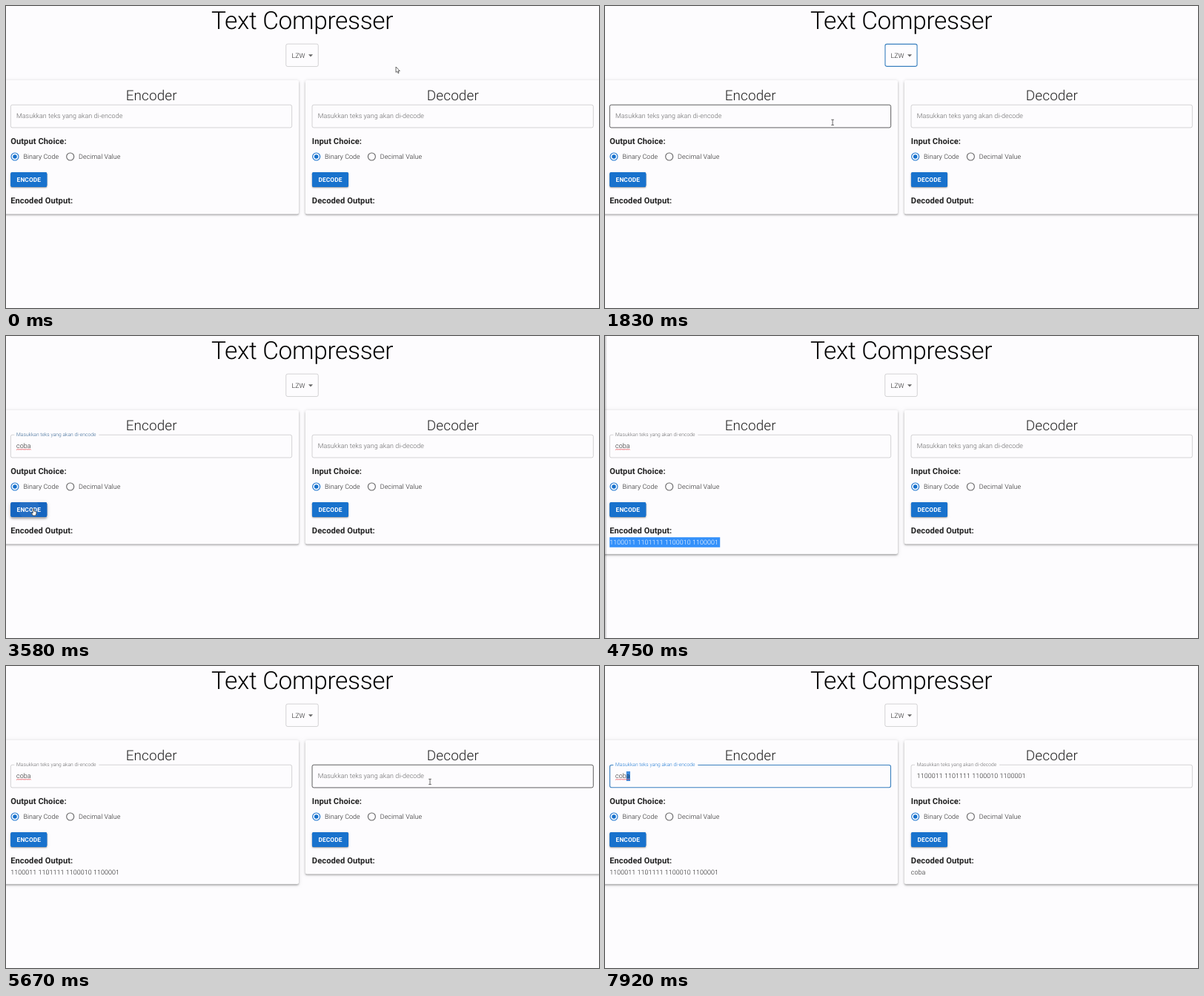
Animation of 800 by 407 pixels, one loop 8 s. Source, as an HTML page with a canvas:

```html
<!DOCTYPE html>
<html lang="id">
<head>
<meta charset="utf-8">
<title>Text Compresser</title>
<style>
html, body { margin: 0; width: 100%; height: 100%; overflow: hidden; background: #fdfcfe; }
canvas { display: block; }
</style>
</head>
<body>
<canvas id="stage" width="800" height="407"></canvas>
<script>
const ctx = document.getElementById('stage').getContext('2d');
ctx.textRendering = 'geometricPrecision';

const LOOP = 8000, STEP = 1000 / 12;
const U = 5 / 9; // page zoom: CSS px to stage px
const PAGE = '#fdfcfe', BLUE = '#1872cd', DEEP_BLUE = '#1565c0', FOCUS = '#3a80bf';
const INK = 'rgba(0,0,0,.87)', MUTED = 'rgba(0,0,0,.6)', LINE = 'rgba(0,0,0,.23)';
const BITS = '1100011 1101111 1100010 1100001';
const DECODER_X = 732 * U;

// Pointer moves: where to, when it sets off, when it arrives.
const START = { x: 526, y: 82 };
const MOVES = [
  { to: { x: 400, y: 68 }, from: 0, until: 420 },        // algorithm menu
  { to: { x: 200, y: 240 }, from: 420, until: 830 },     // encoder panel
  { to: { x: 400, y: 61 }, from: 830, until: 1170 },
  { to: { x: 600, y: 115 }, from: 1170, until: 1420 },   // decoder panel
  { to: { x: 285, y: 160 }, from: 1580, until: 1920 },   // encoder field
  { to: { x: 425, y: 172 }, from: 1920, until: 2420 },
  { to: { x: 262, y: 202 }, from: 2670, until: 3170 },
  { to: { x: 37, y: 233 }, from: 3250, until: 3500 },    // ENCODE
  { to: { x: 448, y: 268 }, from: 3580, until: 3920 },
  { to: { x: 155, y: 279 }, from: 3920, until: 4250 },   // end of the output
  { to: { x: 0, y: 281 }, from: 4250, until: 4580 },
  { to: { x: 613, y: 215 }, from: 4750, until: 4920 },
  { to: { x: 572, y: 156 }, from: 5250, until: 5670 },   // decoder field
  { to: { x: 437, y: 230 }, from: 6080, until: 6500 },   // DECODE
  { to: { x: 29, y: 148 }, from: 7250, until: 7750 }     // encoder value
];

const clamp = v => Math.max(0, Math.min(1, v));
const between = (t, a, b) => t >= a && t < b;
const progress = (t, start, length) => clamp((t - start) / length);
const lerp = (a, b, k) => a + (b - a) * k;

function pointerAt(t) {
  return MOVES.reduce((p, m) => {
    const k = 1 - (1 - progress(t, m.from, m.until - m.from)) ** 2;
    return { x: lerp(p.x, m.to.x, k), y: lerp(p.y, m.to.y, k) };
  }, START);
}

function text(str, x, y, size, { weight = 300, color = INK, align = 'left', spacing = 0.00938 } = {}) {
  ctx.font = `${weight} ${size * U}px Roboto, sans-serif`;
  ctx.letterSpacing = spacing * size * U + 'px';
  ctx.textAlign = align;
  ctx.fillStyle = color;
  ctx.fillText(str, x, y);
}

function box(x, y, w, h, r = 4 * U) {
  ctx.beginPath();
  ctx.roundRect(x, y, w, h, r);
}

function disc(x, y, r, color) {
  ctx.fillStyle = color;
  ctx.beginPath();
  ctx.arc(x, y, r, 0, 7);
  ctx.fill();
}

// Material-style elevation: a tight key shadow and a wide soft one.
function raised(x, y, w, h, color, lift) {
  ctx.save();
  ctx.fillStyle = color;
  for (const [drop, blur, alpha] of [[lift, lift + 1, 0.3], [1, lift * 3, 0.12]]) {
    ctx.shadowColor = `rgba(0,0,0,${alpha})`;
    ctx.shadowOffsetY = drop * U;
    ctx.shadowBlur = blur * U;
    box(x, y, w, h);
    ctx.fill();
  }
  ctx.restore();
}

function outline(x, y, w, h, color, thick) {
  const lw = (thick ? 2 : 1.3) * U;
  ctx.strokeStyle = color;
  ctx.lineWidth = lw;
  box(x + lw / 2, y + lw / 2, w - lw, h - lw);
  ctx.stroke();
}

function radio(label, x, on) {
  ctx.strokeStyle = on ? BLUE : MUTED;
  ctx.lineWidth = 2 * U;
  ctx.beginPath();
  ctx.arc(x, 203, 9 * U, 0, 7);
  ctx.stroke();
  if (on) disc(x, 203, 5 * U, BLUE);
  text(label, x + 11.4, 206.3, 16);
}

function selector(focused) {
  outline(377.4, 50.8, 44.2, 31.1, focused ? FOCUS : LINE, focused);
  text('LZW', 385.4, 69.6, 16);
  ctx.fillStyle = MUTED;
  ctx.beginPath();
  ctx.moveTo(408, 65.3);
  ctx.lineTo(414, 65.3);
  ctx.lineTo(411, 68.4);
  ctx.fill();
}

function field(f) {
  outline(6, 132.9, 380, 31.4, f.focus ? FOCUS : f.hover ? INK : LINE, f.focus);
  ctx.fillStyle = PAGE;
  ctx.fillRect(11.3, 132, 114 * f.float, 2.4);
  const tint = `rgba(${25 * f.tint},${118 * f.tint},${210 * f.tint},${lerp(0.6, 1, f.tint)})`;
  text(f.label, 14, lerp(151.4, 135.2, f.float), lerp(16, 12, f.float), { color: tint });
  if (f.selectLast) {
    ctx.fillStyle = '#3f8de0';
    ctx.fillRect(28.8, 142, 5.2, 13);
  }
  text(f.value, 14, 151.4, 16);
  if (f.spell) {
    ctx.strokeStyle = '#e5393f';
    ctx.lineWidth = 0.8;
    ctx.beginPath();
    const length = ctx.measureText(f.value).width;
    for (let x = 0; x < length; x += 0.5) ctx.lineTo(14 + x, 152.9 + 0.4 * Math.sin(x * 3));
    ctx.stroke();
  }
}

function button(label, b) {
  const x = 6.3, y = 224, w = 49, h = 20;
  raised(x, y, w, h, b.hover ? DEEP_BLUE : BLUE, b.hover ? 4 : 2);
  ctx.save();
  box(x, y, w, h);
  ctx.clip();
  disc(31, 233, 10 + 22 * b.spread, `rgba(255,255,255,${b.glow})`);
  ctx.restore();
  text(label, x + w / 2, 237, 15, { weight: 700, color: '#fff', align: 'center', spacing: 0.01 });
}

function output(str, selected) {
  text(str, 6.2, 281.4, 16);
  if (!selected) return;
  const w = 149 * selected;
  ctx.save();
  ctx.beginPath();
  ctx.rect(155.2 - w, 271.3, w, 13.5);
  ctx.clip();
  ctx.fillStyle = '#3390fa';
  ctx.fillRect(0, 271, 160, 14);
  text(str, 6.2, 281.4, 16, { color: '#fff' });
  ctx.restore();
}

function panel(x, p) {
  const bold = { weight: 700, spacing: 0.0075 };
  ctx.save();
  ctx.translate(x, 0);
  raised(-2.8, 100, 397.8, p.output ? 193.8 : 180.2, PAGE, 3);
  text(p.title, 196.2, 127, 34, { align: 'center', spacing: 0.00735 });
  field(p.field);
  text(p.choice, 6.2, 186.4, 20, bold);
  radio('Binary Code', 12, true);
  radio('Decimal Value', 86.7, false);
  button(p.action, p.button);
  text(p.result, 6.2, 266.4, 20, bold);
  output(p.output, p.selected);
  ctx.restore();
}

function shape(path, fill = '#fff') {
  const p = new Path2D(path);
  ctx.fillStyle = fill;
  ctx.fill(p);
  ctx.strokeStyle = '#444';
  ctx.lineWidth = 0.8;
  ctx.stroke(p);
}

const drawArrow = () => shape('M0 0V7.4L1.7 6L3 8.7L4.1 8.1L3 5.5H5.3Z');
const drawBeam = () => shape('M-1.8 -3.6H1.8M0 -3.6V3.6M-1.8 3.6H1.8');
const drawHand = () => shape('M-.8 0H.6V3L4 4V6L3 9H-.6L-3 5.4L-.8 5.8Z');

function edgeShadow() {
  const edge = ctx.createLinearGradient(0, 0, 3, 0);
  edge.addColorStop(0, 'rgba(0,0,0,.22)');
  edge.addColorStop(1, 'rgba(0,0,0,0)');
  ctx.fillStyle = edge;
  ctx.fillRect(0, 0, 3, 407);
}

function draw(t) {
  const ptr = pointerAt(t);
  const visible = !between(t, 2670, 3170) && !between(t, 4580, 4830) && t < 7920;
  const over = (x, y, w, h) => visible && ptr.x > x && ptr.x < x + w && ptr.y > y && ptr.y < y + h;
  const overField = x => over(x + 6, 133, 380, 31);
  const overButton = x => over(x + 6, 224, 49.4, 20.4);

  const typed = clamp(Math.floor((t - 2500) / 165) / 4) * 4;
  const tint = (on, off) => progress(t, on - 80, 160) * (1 - progress(t, off, 200));
  const ripple = (start, glow) => ({
    spread: progress(t, start, 420),
    glow: t < start ? 0 : glow * (1 - progress(t, start + 180, 330))
  });

  const encoder = {
    title: 'Encoder', choice: 'Output Choice:', action: 'ENCODE', result: 'Encoded Output:',
    output: t >= 3670 ? BITS : '',
    selected: between(t, 4250, 5670) ? progress(t, 4250, 330) : 0,
    field: {
      label: 'Masukkan teks yang akan di-encode', value: 'coba'.slice(0, typed), spell: typed > 0,
      focus: between(t, 1920, 3500) || t >= 7750, hover: overField(0),
      float: progress(t, 1840, 200), tint: tint(1920, 3500) + tint(7750, LOOP),
      selectLast: t >= 7920
    },
    button: { hover: overButton(0), ...ripple(3500, 0.06) }
  };
  const decoder = {
    title: 'Decoder', choice: 'Input Choice:', action: 'DECODE', result: 'Decoded Output:',
    output: t >= 6750 ? 'coba' : '',
    selected: 0,
    field: {
      label: 'Masukkan teks yang akan di-decode', value: t >= 6000 ? BITS : '', spell: false,
      focus: between(t, 5750, 6580), hover: overField(DECODER_X),
      float: progress(t, 5670, 200), tint: tint(5750, 6580),
      selectLast: false
    },
    button: { hover: overButton(DECODER_X), ...ripple(6670, 0.24) }
  };

  ctx.fillStyle = PAGE;
  ctx.fillRect(0, 0, 800, 407);
  text('Text Compresser', 399.6, 31, 60, { color: '#000', align: 'center', spacing: -0.00833 });
  selector(between(t, 420, 1920));
  panel(0, encoder);
  panel(DECODER_X, decoder);
  if (between(t, 4580, 5000)) edgeShadow();

  if (!visible) return;
  ctx.save();
  ctx.translate(ptr.x, ptr.y);
  if (between(t, 4250, 4750) || overField(0) || overField(DECODER_X)) drawBeam();
  else if (overButton(0) || overButton(DECODER_X) || over(377, 51, 44, 31)) drawHand();
  else drawArrow();
  ctx.restore();
}

function tick() {
  const step = Math.floor((performance.now() % LOOP + 4) / STEP) % 96;
  draw(Math.round(step * STEP / 10) * 10);
  requestAnimationFrame(tick);
}
tick();
</script>
</body>
</html>
```
